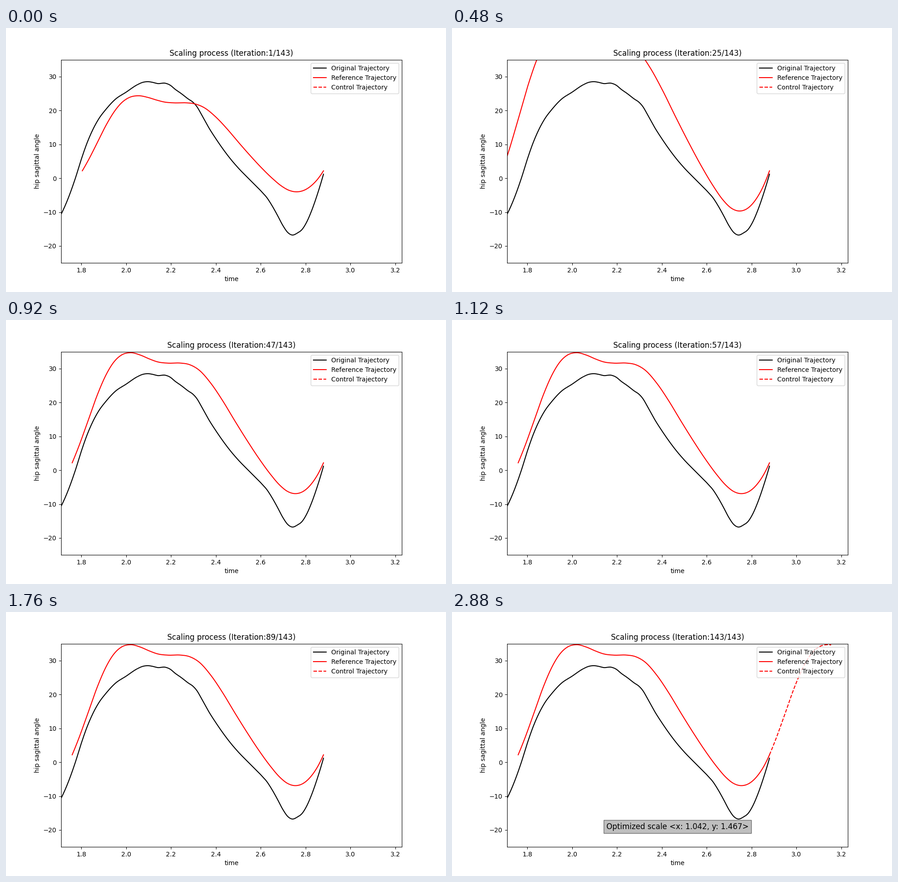
A matplotlib script that plays this animation: 966 px wide and 580 px high, repeating every 4080 ms.

```python
import numpy as np
import matplotlib.pyplot as plt
from matplotlib.animation import FuncAnimation

plt.rcParams["font.family"] = "DejaVu Sans"

EVALS = 143          # objective evaluations, every second one is drawn
HOLD_FROM = 72       # first frame of the final result
FRAMES, STEP_MS = 102, 40

MEASURED = [
    (1.70, -12.0), (1.71, -10.7), (1.731, -7.7), (1.774, 0.0), (1.80, 5.5),
    (1.826, 10.4), (1.85, 14.1), (1.877, 17.4), (1.911, 20.4), (1.952, 23.3),
    (2.0, 25.4), (2.05, 27.6), (2.074, 28.3), (2.10, 28.5), (2.119, 28.3),
    (2.141, 27.95), (2.175, 28.05), (2.196, 27.5), (2.22, 26.2),
    (2.246, 25.0), (2.275, 23.5), (2.299, 22.4), (2.314, 21.3),
    (2.338, 18.6), (2.37, 14.8), (2.40, 11.7), (2.468, 5.5), (2.50, 3.05),
    (2.551, -0.4), (2.602, -3.8), (2.628, -5.75), (2.65, -8.0),
    (2.673, -10.7), (2.699, -13.95), (2.72, -15.95), (2.74, -16.75),
    (2.764, -16.15), (2.786, -15.0), (2.805, -12.95), (2.827, -9.6),
    (2.852, -4.9), (2.88, 1.2),
]
REFERENCE = [
    (1.805, 2.2), (1.83, 5.1), (1.871, 10.4), (1.912, 15.8), (1.952, 20.1),
    (1.982, 22.4), (2.013, 23.8), (2.056, 24.35), (2.098, 23.85),
    (2.135, 23.1), (2.171, 22.5), (2.216, 22.25), (2.267, 22.27),
    (2.307, 21.95), (2.348, 20.85), (2.399, 18.15), (2.45, 14.6),
    (2.50, 10.7), (2.551, 6.85), (2.602, 3.2), (2.653, -0.1),
    (2.693, -2.3), (2.728, -3.6), (2.76, -4.0), (2.795, -3.5),
    (2.829, -2.0), (2.856, -0.1), (2.88, 2.2),
]
# Line searches along x, then y: (evaluation, x scale, y scale),
# each kept until the next entry.
SEARCH = [
    (1, 1, 1), (3, 2, 1), (5, 1, 1), (7, 1.382, 1), (9, 1.06, 1),
    (11, 1.054, 1), (17, 1.054, 2), (19, 1.054, 1), (21, 1.054, 1.382),
    (23, 1.054, 1.457), (25, 1.108, 1.914), (27, 2.054, 1.457),
    (29, 1.054, 1.457), (31, 1.436, 1.457), (33, 1.04, 1.457),
    (35, 1.042, 1.457), (41, 1.042, -0.161), (43, 1.042, 0.839),
    (45, 1.042, 1.467), (65, 1.042, -0.151), (67, 1.042, 0.849),
    (69, 1.042, 1.467), (97, 1.042, 1.46), (99, 1.042, 1.467),
]


def smooth(points, n=400):
    """Cubic Hermite curve through the points."""
    x, y = np.array(points).T
    slope = np.gradient(y, x, edge_order=2)
    t = np.linspace(x[0], x[-1], n)
    i = np.clip(np.searchsorted(x, t, side="right") - 1, 0, len(x) - 2)
    h = x[i + 1] - x[i]
    u = (t - x[i]) / h
    v = ((1 + 2 * u) * (1 - u) ** 2 * y[i] + u * (1 - u) ** 2 * h * slope[i]
         + u ** 2 * (3 - 2 * u) * y[i + 1] - u ** 2 * (1 - u) * h * slope[i + 1])
    return t, v


ref_t, ref_v = smooth(REFERENCE)
END_T, END_V = ref_t[-1], ref_v[-1]


def scaled(sx, sy):
    """Reference stretched about its end point."""
    return END_T + (ref_t - END_T) * sx, END_V + (ref_v - END_V) * sy


def scales_at(count):
    return [row for row in SEARCH if row[0] <= count][-1][1:]


fig, ax = plt.subplots(figsize=(9.66, 5.8), dpi=100)
ax.set_xlim(1.71, 3.23)
ax.set_ylim(-25, 35)
ax.set_xlabel("time")
ax.set_ylabel("hip sagittal angle")
title = ax.set_title("")

ax.plot(*smooth(MEASURED), "k", label="Original Trajectory")
ref_line, = ax.plot([], [], "r", label="Reference Trajectory")
ctrl_line, = ax.plot([], [], "r--", label="Control Trajectory")
ax.legend(loc="upper right")

best_x, best_y = SEARCH[-1][1:]
note = ax.text(0.5, 0.1, f"Optimized scale <x: {best_x:.3f}, y: {best_y:.3f}>",
               transform=ax.transAxes, ha="center", va="center", fontsize=12,
               bbox=dict(facecolor="gray", alpha=0.5))

# The control curve is the best fit, repeated one period later.
ctrl_t, ctrl_v = scaled(best_x, best_y)
ctrl_t = ctrl_t + (END_T - ctrl_t[0])
ahead = ctrl_t <= 3.156


def update(frame):
    count = min(2 * frame + 1, EVALS)
    title.set_text(f"Scaling process (Iteration:{count}/{EVALS})")
    ref_line.set_data(*scaled(*scales_at(count)))
    done = frame >= HOLD_FROM
    ctrl_line.set_data(ctrl_t[ahead] if done else [],
                       ctrl_v[ahead] if done else [])
    note.set_visible(done)
    return title, ref_line, ctrl_line, note


anim = FuncAnimation(fig, update, frames=FRAMES, interval=STEP_MS,
                     init_func=lambda: update(0), repeat=True, blit=False)
plt.show()
```
